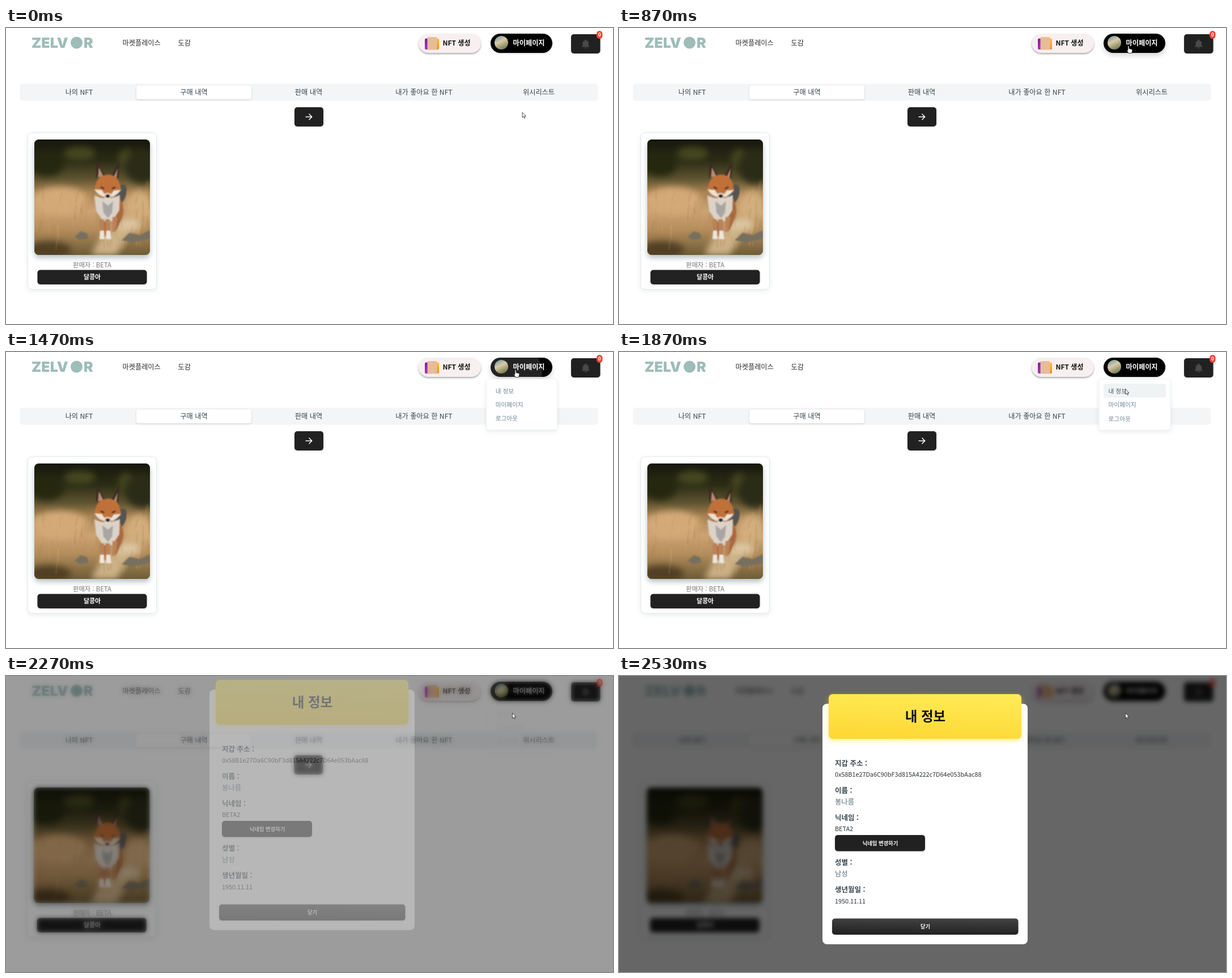
Animation, 1071 px wide and 523 px high, one loop 2.59 s. Source, as an HTML page:

```html
<!DOCTYPE html>
<html lang="ko">
<head>
<meta charset="utf-8">
<style>
  html, body { margin: 0; width: 100%; height: 100%; overflow: hidden; background: #fff; }
  svg, #overlay { position: absolute; left: 0; top: 0; width: 1071px; height: 523px; }
  svg { font-family: "Noto Sans CJK KR", "Noto Sans CJK", "Noto Sans", sans-serif; }
  #overlay { background: rgba(0, 0, 0, .6); backdrop-filter: blur(4px); }
  .mid { text-anchor: middle; }
  .bold { font-weight: 700; }
  .light { font-weight: 300; }
  .dark { fill: #212121; }
  .low { filter: drop-shadow(0 1px 1.5px rgba(0, 0, 0, .16)); }
  .high { filter: drop-shadow(0 2px 1.5px rgba(40, 40, 40, .4)); }
  .soft { filter: drop-shadow(0 3px 4px rgba(70, 100, 110, .12)); }
  .glow { filter: drop-shadow(0 3px 4px rgba(253, 216, 53, .5)); }
  .blur { filter: blur(6px); }
  .haze { filter: blur(.9px); }
</style>
</head>
<body>
<svg id="page" viewBox="0 0 1071 523">
  <defs>
    <linearGradient id="field" x2="0" y2="1">
      <stop stop-color="#17180c"/><stop offset=".18" stop-color="#2a2b15"/>
      <stop offset=".34" stop-color="#5f5430"/><stop offset=".46" stop-color="#a98454"/>
      <stop offset=".62" stop-color="#cda372"/><stop offset=".78" stop-color="#b48d5c"/>
      <stop offset="1" stop-color="#6e5c36"/>
    </linearGradient>
    <linearGradient id="purple" x2="0" y2="1"><stop stop-color="#7b1fa2"/><stop offset="1" stop-color="#b52ac4"/></linearGradient>
    <linearGradient id="orange" x2="0" y2="1"><stop stop-color="#ffc412"/><stop offset="1" stop-color="#f58a1c"/></linearGradient>
    <linearGradient id="avatar" x2=".5" y2="1">
      <stop stop-color="#5f93a6"/><stop offset=".5" stop-color="#d9cba6"/><stop offset="1" stop-color="#7d8256"/>
    </linearGradient>
    <clipPath id="photoClip"><rect x="50" y="197" width="204" height="204" rx="8"/></clipPath>
    <clipPath id="pillClip"><rect x="855" y="10" width="109" height="34" rx="17"/></clipPath>
  </defs>

  <!-- header -->
  <g fill="#9dbdb8">
    <text x="45" y="35" style="font:900 25px Inter,sans-serif">ZELV</text>
    <circle cx="124.500" cy="26" r="10.5"/>
    <text x="137" y="35" style="font:900 25px Inter,sans-serif">R</text>
  </g>
  <g font-size="12.2" font-weight="500" fill="#2b2b2b">
    <text x="205.5" y="31">마켓플레이스</text><text x="303.5" y="31">도감</text>
  </g>
  <rect class="high" x="728" y="10" width="110" height="34" rx="17" fill="#f7eff0"/>
  <rect x="739" y="18.500" width="12" height="19.500" rx="2" fill="url(#purple)"/>
  <rect x="752" y="18.500" width="12" height="19.500" rx="2" fill="url(#orange)"/>
  <rect x="743.500" y="16" width="17" height="22.500" rx="2" fill="#e6bd98"/>
  <text class="bold" x="770.500" y="31" font-size="12" fill="#111">NFT 생성</text>
  <rect id="pill" x="855" y="10" width="109" height="34" rx="17"/>
  <circle id="ripple" cx="899" cy="36" fill="#fff" clip-path="url(#pillClip)"/>
  <circle cx="874" cy="26" r="12" fill="url(#avatar)"/>
  <text class="bold" x="894.500" y="31" font-size="12.2" fill="#fff">마이페이지</text>
  <rect class="dark low" x="997" y="11" width="51.500" height="34" rx="5"/>
  <path d="M1016 33.500v-1l1.500-1.500v-4q0-4 4-5v-1.500h2.500v1.500q4 1 4 5v4l1.500 1.500v1zM1021 34.500h4q-.5 1.700-2 1.700t-2-1.700z" fill="#494949"/>
  <rect x="1042" y="5" width="10.500" height="14" rx="5.200" fill="#f44336"/>
  <text class="mid bold" x="1047.300" y="15.200" font-size="8.500" fill="#fff">0</text>

  <!-- tabs and card -->
  <g id="boxes">
    <rect x="24.500" y="98.500" width="1020" height="30" rx="5" fill="#f3f5f7"/>
    <rect class="low" x="230" y="101.500" width="203" height="24.500" rx="4" fill="#fff"/>
    <rect class="dark low" x="509" y="140" width="51" height="34" rx="5"/>
    <path d="M528.500 157h11M534.500 151.800l5.200 5.200-5.200 5.200" fill="none" stroke="#fff" stroke-width="1.500"/>
    <rect class="soft" x="38.500" y="185" width="227" height="276.500" rx="7" fill="#fff" stroke="#e3e9ec"/>
    <rect x="50" y="197" width="204" height="204" rx="8" fill="#8b7a5a" style="filter:drop-shadow(0 5px 5px rgba(70,100,110,.4))"/>
    <g clip-path="url(#photoClip)">
      <rect x="50" y="197" width="204" height="204" fill="url(#field)"/>
      <g class="blur">
        <ellipse cx="130" cy="222" rx="28" ry="12" fill="#454720"/>
        <ellipse cx="212" cy="232" rx="14" ry="18" fill="#45461f"/>
        <ellipse cx="240" cy="245" rx="30" ry="30" fill="#2b2c18"/>
        <ellipse cx="72" cy="242" rx="30" ry="20" fill="#25280f"/>
        <ellipse cx="95" cy="305" rx="50" ry="24" fill="#d3a977"/>
        <ellipse cx="234" cy="312" rx="22" ry="24" fill="#d2ad7d"/>
        <ellipse cx="215" cy="348" rx="24" ry="13" fill="#dbc4a0"/>
        <ellipse cx="75" cy="392" rx="40" ry="15" fill="#513f24"/>
        <path d="M150 401l25-46 46 3-26 43z" fill="#cbb186"/>
      </g>
      <g id="grass" class="haze" fill="none"></g>
      <g class="haze">
        <path d="M204 375l14-13 18 4 18-9v16l-30 6zM121 369l11-10 11 4 3 9-16 3z" fill="#77705f"/>
        <path d="M197 279q15-7 16 6 0 16-12 28l-10-10z" fill="#55534e"/>
        <path d="M160 300q20-14 41 1 10 16 3 36l-9 20-7 3v-22h-7l-1 30h-8l-2-30q-13-16-10-38z" fill="#a9683d"/>
        <path d="M156 296q23 10 45-1l-1 27-12 19-16 1-13-19z" fill="#dcd3c8"/>
        <path d="M170 306l10 8 9-8-2 20-7 10-8-10z" fill="#a9a5a3"/>
        <path d="M165 338h8l1 34h-9zM175 338h8l3 35h-10zM188 334h9l-4 26h-6z" fill="#b98258"/>
        <path d="M166 358h7l1 15h-9zM177 358h7l2 15h-10z" fill="#eee6dc"/>
        <path d="M159 264l1-29 15 27zM186 262l14-27-2 30z" fill="#3a2a22"/>
        <path d="M162 264l2-18 8 16zM190 263l7-15-2 18z" fill="#b98d72"/>
        <path d="M156 285q3-25 24-26 20 0 23 27-8 8-16 11l-7 6-8-6q-10-5-16-12z" fill="#c0713a"/>
        <path d="M156 285l13 1 6 9-3 4q-11-5-16-14zM203 286l-13 1-6 9 3 3q11-5 16-13z" fill="#ece2d6"/>
        <path d="M173 293l6-2 7 2-2 8-5 3-5-3z" fill="#e5d9cc"/>
        <path d="M167 281l6 3M193 281l-6 3" stroke="#3a281c" stroke-width="2"/>
        <ellipse cx="179.500" cy="297" rx="3.500" ry="2.700" fill="#211c1b"/>
      </g>
    </g>
    <rect class="dark low" x="55.500" y="427.500" width="193" height="25.500" rx="5"/>
  </g>
  <g class="mid light" font-size="12.2" fill="#37434a">
    <text x="129" y="118">나의 NFT</text><text x="331.500" y="118">구매 내역</text>
    <text x="534" y="118">판매 내역</text><text x="737.500" y="118">내가 좋아요 한 NFT</text>
    <text x="940" y="118">위시리스트</text>
  </g>
  <text class="mid light" x="152" y="422.700" font-size="11.300" fill="#757575">판매자 : BETA</text>
  <text class="mid bold" x="152" y="444" font-size="10.900" fill="#fff">달콩아</text>

  <!-- dropdown -->
  <g id="menu">
    <rect class="soft" x="847" y="48" width="126" height="90" rx="4" fill="#fff" stroke="#f0f2f4"/>
    <rect id="hover" x="855" y="56" width="110" height="24.500" rx="4" fill="#f0f3f4"/>
    <g font-size="10.700" fill="#6b8592">
      <text id="info" x="863.500" y="73">내 정보</text><text x="863.500" y="97.400">마이페이지</text><text x="863.500" y="122">로그아웃</text>
    </g>
  </g>
</svg>

<div id="overlay"></div>

<svg id="dialog" viewBox="0 0 1071 523">
  <defs>
    <linearGradient id="yellow" x1=".38" y1="1" x2=".62" y2="0"><stop stop-color="#fdd835"/><stop offset="1" stop-color="#ffea55"/></linearGradient>
    <linearGradient id="gray" x1=".45" y1="1" x2=".55" y2="0"><stop stop-color="#212121"/><stop offset="1" stop-color="#424242"/></linearGradient>
  </defs>
  <rect x="359" y="49" width="362" height="425" rx="8" fill="#fff"/>
  <rect class="glow" x="370" y="32" width="340" height="79" rx="7" fill="url(#yellow)"/>
  <text class="mid bold" x="540.500" y="80" font-size="23.500" fill="#111">내 정보</text>
  <g class="bold" font-size="12.500" fill="#37474f">
    <text x="381" y="158.500">지갑 주소 :</text><text x="381" y="206.500">이름 :</text><text x="381" y="254.500">닉네임 :</text>
    <text x="381" y="333.700">성별 :</text><text x="381" y="382">생년월일 :</text>
  </g>
  <g class="light" font-size="10.800" fill="#263238">
    <text x="381" y="178">0x58B1e27Da6C90bF3d815A4222c7D64e053bAac88</text>
    <text x="381" y="274.300">BETA2</text><text x="381" y="402">1950.11.11</text>
  </g>
  <g class="light" font-size="12.300" fill="#546e7a">
    <text x="381" y="226.500">봉나름</text><text x="381" y="353.700">남성</text>
  </g>
  <rect class="dark low" x="381" y="281" width="159" height="28.500" rx="5"/>
  <rect class="low" x="376" y="428.500" width="328.500" height="28.500" rx="5" fill="url(#gray)"/>
  <g class="mid bold" font-size="9.300" fill="#fff">
    <text x="461" y="298.600">닉네임 변경하기</text><text x="540.500" y="446">닫기</text>
  </g>
</svg>

<svg viewBox="0 0 1071 523">
  <g id="cursor" fill="#fff" stroke="#222" stroke-width=".8" stroke-linejoin="round">
    <path id="arrow" d="M0 0v9.200l2.100-1.900 1.500 3.200 1.500-.7-1.500-3.100h2.800z"/>
    <path id="hand" d="M-1 1q1-1.500 2 0v4.500l5 1.300q1 .5.7 2l-1 4.700H0l-2.700-4.500q-.3-1.500 1.700-.5z"/>
  </g>
</svg>

<script>
const LOOP = 2590, STEP = 1000 / 15;
const $ = id => document.getElementById(id);

// Each key is [tick, value...]; values are linear between keys.
const CURSOR = [[4, 911, 149], [6, 926, 122], [8, 936, 82], [10, 914, 48], [11, 880, 37], [12, 884, 32], [13, 899, 31],
  [23, 899, 31], [24, 896, 39], [25, 894, 51], [26, 893, 62], [28, 893.5, 65.5]];
const MENU = [[18, 0, .95], [19, .15, .96], [20, .65, .98], [21, 1, .993], [27, 1, .993], [28, 1, 1],
  [32, 1, 1], [33, .94, 1], [34, .14, .96], [35, 0, .95]];
const SHADE = [[32, 0], [33, .065], [34, .65], [35, .99], [36, 1]];
const DIALOG = [[33, 0, -50], [34, .28, -25], [35, .7, -11], [36, .93, -4], [37, 1, -1], [38, 1, 0]];

function at(keys, n) {
  const i = keys.findIndex(key => key[0] >= n);
  if (i < 0) return keys[keys.length - 1].slice(1);
  if (i === 0) return keys[0].slice(1);
  const a = keys[i - 1], b = keys[i], u = (n - a[0]) / (b[0] - a[0]);
  return a.slice(1).map((v, k) => v + (b[k + 1] - v) * u);
}

function plantGrass() {
  let seed = 7;
  const random = () => (seed = seed * 16807 % 2147483647) / 2147483647;
  const tones = ['#e3c08d', '#b98a52', '#8a6a3c', '#d8b27c'];
  let blades = '';
  for (let i = 0; i < 90; i++) {
    const x = 50 + random() * 204, y = 300 + random() * 95;
    const height = 12 + random() * 28, lean = random() * 12 - 3;
    blades += `<path d="M${x} ${y}q0 ${-height / 2} ${lean} ${-height}" stroke="${tones[i % 4]}" opacity=".4"/>`;
  }
  $('grass').innerHTML = blades;
}

function draw(time) {
  const n = Math.floor((time % LOOP + 4) / STEP);

  const [x, y] = at(CURSOR, n);
  const overPill = x > 855 && x < 964 && y > 10 && y < 44;
  $('cursor').setAttribute('transform', `translate(${x} ${y})`);
  $('hand').style.display = overPill ? '' : 'none';
  $('arrow').style.display = overPill ? 'none' : '';
  $('pill').style.filter = `drop-shadow(0 ${overPill ? 4 : 1}px ${overPill ? 5 : 1.5}px rgba(0,0,0,.18))`;

  $('ripple').setAttribute('r', Math.max(0, 10 + 12.3 * (n - 19)));
  $('ripple').style.opacity = n >= 19 && n < 27 ? .22 * (1 - (n - 19) / 8) : 0;

  const [menuAlpha, scale] = at(MENU, n);
  const hovering = y > 56 && n > 24 && n < 34;
  $('menu').style.opacity = menuAlpha;
  $('menu').setAttribute('transform', `translate(910 48) scale(${scale}) translate(-910 -48)`);
  $('hover').style.opacity = hovering ? 1 : 0;
  $('info').style.fill = hovering ? '#455a64' : '';

  $('boxes').setAttribute('transform', `translate(${n >= 33 ? -.8 : 0} 0)`);
  $('overlay').style.opacity = at(SHADE, n)[0];
  const [dialogAlpha, drop] = at(DIALOG, n);
  $('dialog').style.opacity = dialogAlpha;
  $('dialog').style.transform = `translateY(${drop}px)`;
}

function tick() {
  draw(performance.now());
  requestAnimationFrame(tick);
}
plantGrass();
tick();
</script>
</body>
</html>
```
